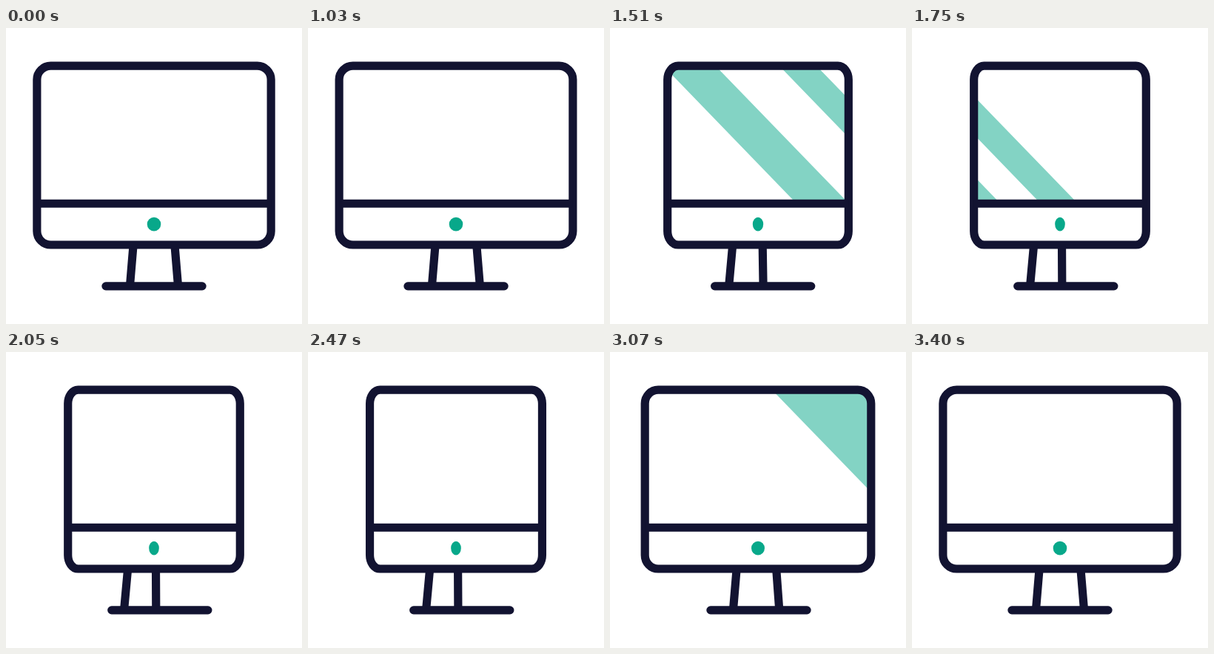
An HTML page for the animation above (3430 ms loop, 400 by 400 pixels).

```html
<!DOCTYPE html>
<html lang="en">
<head>
<meta charset="utf-8">
<title>Turning monitor</title>
<style>
  html, body { margin: 0; height: 100%; overflow: hidden; background: #fff; }
  svg { display: block; width: 100vw; height: 100vh; }
  .line { fill: none; stroke: #121331; stroke-width: 12; stroke-linecap: round; stroke-linejoin: round; }
  .legs { stroke-linecap: butt; }
  .shine { fill: #08a88a; fill-opacity: .5; }
</style>
</head>
<body>
<svg viewBox="0 0 430 430">
  <clipPath id="screen"><rect id="glass" y="55" height="260" ry="20"/></clipPath>
  <path id="shine" class="shine" clip-path="url(#screen)"/>
  <path id="legs" class="line legs"/>
  <path id="base" class="line"/>
  <rect id="frame" class="line" y="55" height="260" ry="20"/>
  <path id="divider" class="line legs"/>
  <ellipse id="dot" cx="215" cy="285" ry="10" fill="#08a88a"/>
</svg>
<script>
const LOOP = 3430, HOLD = 1000, STEP = 30;
const el = id => document.getElementById(id);
const set = (id, attrs) => {
  for (const name in attrs) el(id).setAttribute(name, attrs[name]);
};
const mix = (a, b, p) => a + (b - a) * p;
const progress = (t, start, end) => Math.min(1, Math.max(0, (t - start) / (end - start)));
const smooth = x => x * x * (3 - 2 * x);

// Cubic bezier (.3, 0, .43, 1), solved by bisection
function ease(x) {
  let lo = 0, hi = 1;
  for (let i = 0; i < 24; i++) {
    const s = (lo + hi) / 2, r = 1 - s;
    if (3 * r * r * s * .3 + 3 * r * s * s * .43 + s ** 3 < x) lo = s; else hi = s;
  }
  return smooth(lo);
}

// Diagonal band sweeping across the glass; centre is measured near its top edge
function band(t, start, end, from, to, width) {
  const p = progress(t, start, end);
  if (p === 0 || p === 1) return '';
  const left = mix(from, to, smooth(p)) - width / 2 - 6;
  return `M${left} 55h${width}l193.6 200h${-width}z`;
}

function draw(t) {
  const turn = ease(progress(t, 1000, 1775)) - ease(progress(t, 2440, 3370));
  const half = mix(170, 125, turn), squash = half / 170;
  const box = { x: 215 - half, width: 2 * half, rx: 20 * squash };
  set('glass', box);
  set('frame', box);
  set('divider', { d: `M${215 - half} 255h${2 * half}` });
  set('dot', { rx: 10 * squash });
  set('legs', {
    d: `M${mix(185, 177, turn)} 315L${mix(180, 171.5, turn)} 375` +
       `M${mix(245, 217.7, turn)} 315L${mix(250, 218, turn)} 375`
  });
  set('base', { d: `M${mix(145, 153.4, turn)} 375h140` });
  set('shine', {
    d: band(t, 1000, 2030, 452, -219, 76) +
       band(t, 1233, 2106, 430, -204, 54) +
       band(t, 2440, 3370, -210, 489, 152.6)
  });
}

function tick(now) {
  const t = now % LOOP;
  draw(HOLD + Math.max(0, Math.floor((t - HOLD) / STEP)) * STEP);
  requestAnimationFrame(tick);
}
tick(0);
</script>
</body>
</html>
```
